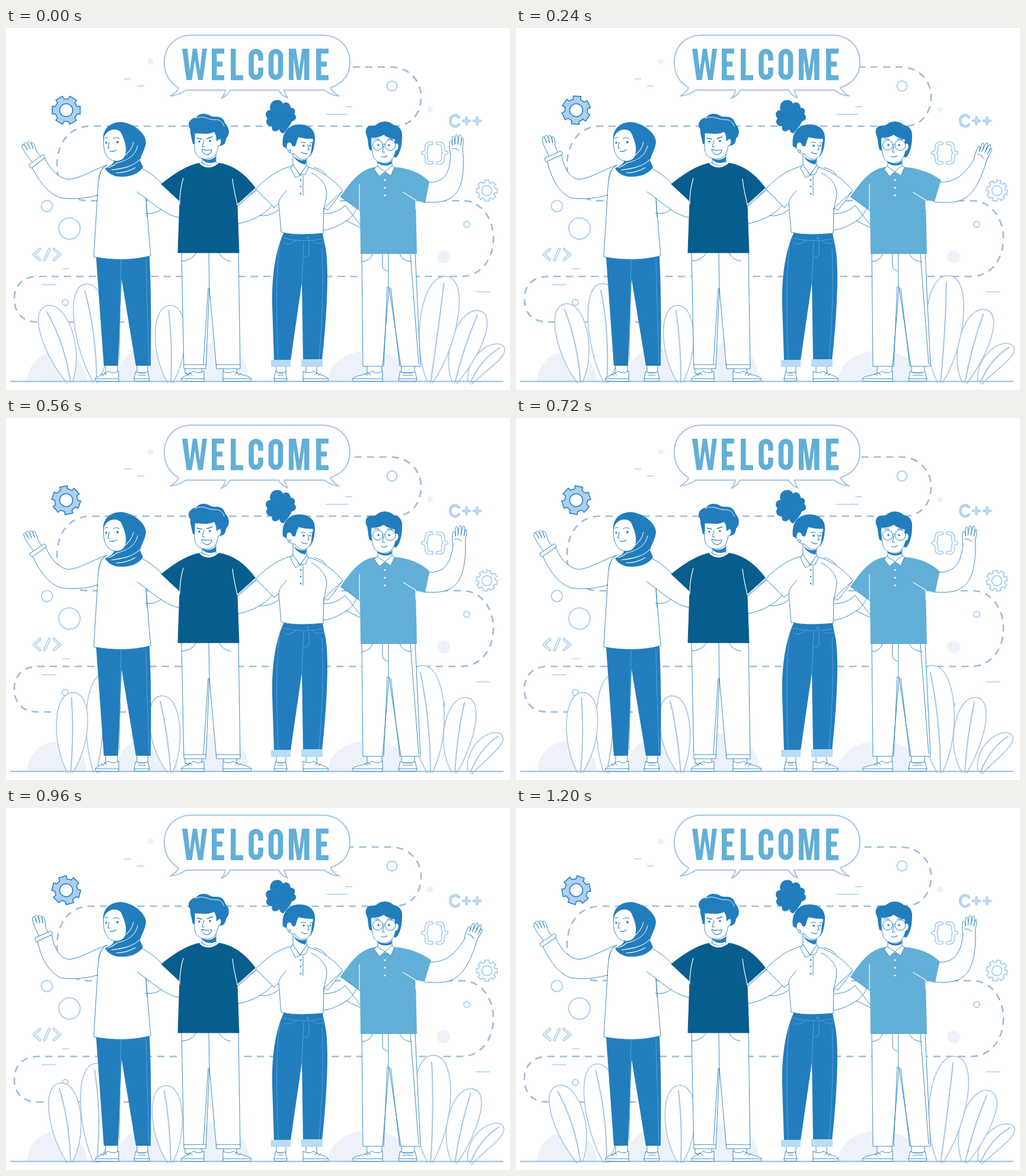
An HTML page with a canvas that plays this animation: 850 by 612 pixels, repeating every 1280 ms.

```html
<!DOCTYPE html>
<html lang="en">
<head>
<meta charset="utf-8">
<title>Welcome</title>
<style>
html, body { margin: 0; width: 100%; height: 100%; overflow: hidden; background: #fff; }
canvas { display: block; width: 850px; height: 612px; }
</style>
</head>
<body>
<canvas id="stage" width="850" height="612" role="img" aria-label="WELCOME"></canvas>
<script>
const ctx = document.getElementById('stage').getContext('2d');
const LOOP = 1280, STEP = 80;
const LINE = '#2580bf', MID = '#227dbd', DARK = '#075d8d', SKY = '#62afd7';
const PALE = '#acd0f1', SOFT = '#a6c5e4', MIST = '#edf2fa', SEAM = '#5aa6e6', WHITE = '#fff';
const RAD = Math.PI / 180;
const paths = new Map();

function path(d) {
  if (!paths.has(d)) paths.set(d, new Path2D(d));
  return paths.get(d);
}
function draw(d, fill, stroke = LINE, w = .9) {
  const p = d instanceof Path2D ? d : path(d);
  if (fill) { ctx.fillStyle = fill; ctx.fill(p); }
  if (stroke) { ctx.strokeStyle = stroke; ctx.lineWidth = w; ctx.stroke(p); }
}
const fill = (d, color) => draw(d, color, null);
const line = (d, color = LINE, w = .9) => draw(d, null, color, w);

function disc(x, y, r, color, stroke = null, w = 1) {
  const p = new Path2D();
  p.arc(x, y, r, 0, 7);
  draw(p, color, stroke, w);
}
function turned(x, y, angle, fn) {
  ctx.save();
  ctx.translate(x, y);
  ctx.rotate(angle * RAD);
  ctx.translate(-x, -y);
  fn();
  ctx.restore();
}
// Returns a function that turns points around a pivot
function turner(px, py, angle) {
  return (x, y, share = 1) => {
    const a = angle * share * RAD, c = Math.cos(a), s = Math.sin(a);
    return [px + (x - px) * c - (y - py) * s, py + (x - px) * s + (y - py) * c];
  };
}

function gear(x, y, r, teeth, angle, body, stroke, hole, w) {
  const p = new Path2D(), unit = 2 * Math.PI / teeth;
  for (let i = 0; i < teeth; i++) {
    for (const [off, k] of [[-.31, .79], [-.26, 1], [.26, 1], [.31, .79]]) {
      const a = (i + off) * unit + angle * RAD;
      p.lineTo(x + Math.cos(a) * r * k, y + Math.sin(a) * r * k);
    }
  }
  p.closePath();
  draw(p, body, stroke, w);
  disc(x, y, hole, WHITE, stroke, w);
}

function leaf(x, h, w, angle, bend) {
  turned(x, 600, angle, () => {
    const k = w * .66, low = 600 - h * .36, top = 600 - h;
    draw(new Path2D(`M${x - 4} 600C${x - k - bend} ${low} ${x - k} ${top} ${x} ${top}C${x + k} ${top} ${x + k - bend} ${low} ${x + 4} 600`), WHITE, SOFT, 1.6);
    line(new Path2D(`M${x + 1} 600Q${x + w * .08 - bend} ${600 - h * .5} ${x - w * .05} ${600 - h * .94}`), SOFT, 2);
  });
}

function sideShoe(x, w, dir) {
  ctx.save();
  ctx.translate(x, 597);
  ctx.scale(dir, 1);
  draw(new Path2D(`M0 0V-17Q9 -11 18 -17C24 -10 ${w - 8} -11 ${w - 1} -5Q${w + 1} 0 ${w - 2} 0Z`), WHITE);
  line(new Path2D(`M0 -4H${w - 1}M20 -10l5 -5M25 -9l5 -4`));
  ctx.restore();
}
function frontShoe(x, w) {
  draw(new Path2D(`M${x + 3} 581Q${x + w / 2} 586 ${x + w - 3} 581L${x + w} 594Q${x + w} 597 ${x + w - 3} 597H${x + 3}Q${x} 597 ${x} 594Z`), WHITE);
  line(new Path2D(`M${x} 593H${x + w}M${x + 7} 583h${w - 14}m0 4h${14 - w}`));
}
function legs(...xs) {
  for (const [x, w] of xs) draw(new Path2D(`M${x} 568V584H${x + w}V568`), WHITE);
}

function backdrop(t) {
  fill('M36 597A50 50 0 0 1 136 597ZM186 597A52 56 0 0 1 290 597ZM300 597A54 64 0 0 1 410 597ZM543 597A70 52 0 0 1 683 597Z', MIST);
  disc(244, 57, 5, MIST);
  disc(715, 138, 5, MIST);
  disc(738, 387, 11, MIST);
  line('M199 86h12M221 98h12M572 133h12M540 146h37M95 407h12M60 434h25M792 446h24', PALE, 1.6);

  ctx.setLineDash([12, 9]);
  ctx.lineDashOffset = -5 + 42 * t / LOOP;
  line('M580 66H650C676 66 700 86 700 116C700 146 682 166 655 166H142C106 166 86 196 86 232C86 270 106 292 140 292H770C800 292 822 320 822 356C822 392 800 420 768 420H54C28 420 14 436 14 458C14 482 28 497 54 497H212', '#a0bcd8', 2.7);
  ctx.setLineDash([]);

  const rings = [[651, 98, 8.5], [69, 301, 9.5], [107, 339, 18], [100, 464, 5], [777, 332, 5], [735, 485, 5]];
  for (const [x, y, r] of rings) disc(x, y, r, WHITE, PALE, 2);

  ctx.lineCap = 'round';
  const plus = 'M764 151C758 144 749 149 749.5 157C749 165 758 170 764 163M771 157h11M776.5 151.5v11M789 157h11M794.5 151.5v11';
  line(plus, PALE, 4.6);
  line(plus, '#d9eafa', .8);
  const code = 'M57 374L47 383L57 392M73 374L65 392M81 374L91 383L81 392';
  line(code, PALE, 5);
  line(code, WHITE, 1.6);
  const braces = 'M718 195H715Q709 195 709 202V205Q709 211 703 211Q709 211 709 217V221Q709 228 715 228H718M728 195H731Q737 195 737 202V205Q737 211 743 211Q737 211 737 217V221Q737 228 731 228H728';
  line(braces, PALE, 6.6);
  line(braces, WHITE, 3);
  ctx.lineCap = 'butt';

  const spin = 180 * t / LOOP;
  gear(101.5, 139, 24.5, 6, spin, PALE, LINE, 11, 1.6);
  gear(811, 275, 18, 8, -spin, WHITE, PALE, 8.5, 2);

  const sway = .5 - .5 * Math.cos(2 * Math.PI * t / LOOP);
  leaf(152, 168, 56, -6 + 12 * sway, -5);
  leaf(108, 136, 52, -17 + 20 * sway, -7 + 7 * sway);
  leaf(277, 131, 50, -7 * sway, 0);
  leaf(782, 84, 32, 42 - 3 * sway, 16);
  leaf(756, 129, 50, 20 - 11 * sway, 10);
  leaf(715, 182, 62, 9 - 14 * sway, 5 - 8 * sway);
}

function bubble() {
  draw('M314 12H532C562 12 580 32 580 58C580 80 567 94 547 101Q553 111 562 115Q546 113 537 105H469Q471 112 475 118Q464 114 460 105H378Q374 114 363 119Q370 111 370 105H303Q293 113 277 115Q289 108 291 101C276 92 267 78 267 58C267 32 285 12 314 12Z', WHITE, SOFT, 2);
  fill('M297 35h9l4 37 5-37h7l5 37 4-37h8l-7 53h-8l-5.5-34-5 34h-9z', SKY);
  fill('M477 88V35h12l5.5 36 5-36h12v53h-8.5V51l-5.500 37h-7l-5.500-37v37z', SKY);
  ctx.lineCap = 'butt';
  for (const x of [347, 523]) line(`M${x + 4.3} 35V88M${x} 39H${x + 21}M${x} 61H${x + 18}M${x} 84H${x + 21}`, SKY, 8.4);
  line('M383.300 35V88M379 84H400', SKY, 8.4);
  line('M429.500 55V48a8 8.500 0 0 0-16 0V75a8 8.500 0 0 0 16 0V67', SKY, 8.6);
  line('M463 48a8 8.500 0 0 0-16 0V75a8 8.500 0 0 0 16 0Z', SKY, 8.6);
  ctx.lineCap = 'round';
}

function scarfWoman(wave) {
  legs([168, 20], [221, 18]);
  sideShoe(190, 40, -1);
  frontShoe(216, 26);
  fill('M152 388L165 571H189L195 425L219 571H244C245 510 245 450 242 386Z', MID);
  line('M194 391L191 560M236 391L241 566', SEAM);

  // far arm and the body
  draw('M226 236C241 243 252 252 263 263L296 290V321C275 319 255 303 236 288L221 277', WHITE);
  const turn = 13 * wave, r = turner(95, 270, turn);
  turned(95, 270, turn, () => {
    draw('M47 230L37 217C32 211 27 203 27 198C30 195 33 200 36 206L30 196C33 190 37 196 41 205L36 194C39 189 43 195 46 204L42 194C46 191 49 199 51 207C54 212 56 216 60 218', WHITE);
    draw('M39 231L62 214Q66 215 66 219L43 237Q39 236 39 231Z', WHITE);
  });
  draw(new Path2D(`M170 232C150 238 125 255 105 256Q${r(82, 253, .5)} ${r(65, 220)}L${r(44, 236)}Q${r(65, 278, .6)} 92 287C115 291 140 287 156 282`), WHITE);
  draw('M170 232C157 238 156 254 155 270L148 387C180 393 215 393 244 385L236 288', WHITE);
  fill('M168 234L154 260L153 281L236 290L228 234Z', WHITE);
  line('M170 232C157 238 156 254 154 284M236 288L238 320M221 277L236 288');
  line('M235 313C245 315 256 312 262 306');

  fill('M164 190C162 170 177 159 193 159C214 160 235 177 236 192C236 203 228 214 226 224L231 235C224 248 205 253 187 251C177 249 170 243 167 237C177 233 182 229 183 222Z', MID);
  draw('M165 184C170 171 186 167 194 176C201 190 206 206 200 218C195 226 182 228 173 220C166 213 163 200 165 184Z', WHITE);
  line('M167 186l5-1M181 187q5-3 10 0M174 193l-2 10h3M175 208q6 2 11-2', LINE, 1.1);
  disc(169, 194, 1.7, MID);
  disc(188, 193, 1.9, MID);
  line('M215 193C213 204 206 212 197 218M222 199C219 214 206 224 187 228C182 232 177 235 172 236M226 222C214 235 194 238 178 240M218 236C207 243 196 245 186 245', WHITE, 1.1);
}

function armsBehind() {
  draw('M425 271L388 299V331C410 329 440 314 450 298Z', WHITE);
  line('M428 317C440 319 452 314 462 306');
  draw('M535 314C552 314 562 309 572 300L603 340L574 326C562 334 550 340 535 342Z', WHITE);
  line('M574 326C583 320 588 313 591 305');
}

function grinMan() {
  legs([302, 28], [367, 22]);
  sideShoe(334, 39, -1);
  sideShoe(366, 48, 1);
  draw('M296 378L300 576H337L343 440L355 576H395L392 378Z', WHITE);
  line('M300 569H337M354 569H395M341 440L333 568M342 380L343 445M297 394Q314 393 321 380M359 380Q366 393 379 394');
  draw('M330 228C310 230 285 245 262 264L293 293L290 380H393L390 300L421 271C405 249 385 232 357 228Z', DARK, DARK);
  line('M299 254C294 270 293 285 293 298', WHITE, 1.2);
  line('M382 255C384 275 388 287 390 299L421 271', WHITE, 1.2);
  line('M391 301L422 274');

  draw('M331 215V229Q342 236 354 229V213', WHITE);
  fill('M331 220C339 225 348 223 354 217V226Q340 232 331 222Z', MID);
  line('M328 229Q342 240 357 228', WHITE, 3);
  fill('M312 182C310 177 312 173 310 170C305 162 310 153 321 151C325 144 336 143 344 148C350 152 357 148 363 152C369 155 368 160 371 163C378 171 377 182 371 187C371 194 367 199 361 199L315 196Z', MID);
  draw('M318 178C319 192 316 204 320 212C326 223 342 224 351 217C356 211 357 204 358 199C363 200 365 188 360 187L355 191C356 184 353 178 351 175C341 181 329 177 318 178Z', WHITE);
  line('M319 153C333 146 342 156 352 155C361 154 366 160 368 166', WHITE, .9);
  line('M322 186l8 2M339 187l9-3', LINE, 1.4);
  line('M334 190L331 201H335', LINE, 1);
  disc(326, 192, 1.8, MID);
  disc(344, 191, 1.8, MID);
  draw('M330 205Q338 208 347 206C346 217 332 217 330 205Z', WHITE, LINE, 1.1);
}

function bunWoman() {
  legs([456, 16], [506, 18]);
  frontShoe(452, 22);
  sideShoe(501, 43, 1);
  fill('M469 345C452 380 448 430 449 470L452 562H480L499 430L501 562H533C540 500 544 430 541 390C540 370 535 357 534 346Z', MID);
  line('M467 355Q500 364 536 356M511 360V383Q509 388 503 387M502 362L499 430M468 362Q472 370 489 360M516 359Q522 368 537 362M462 363C455 410 456 480 459 560M533 372C536 430 533 500 528 560', SEAM);
  disc(509, 355, 1.7, null, SEAM);
  fill('M447 561H480V573H447ZM498 560H534V573H498Z', '#b9dcf6');

  draw('M484 233C462 238 443 250 421 272L452 303L460 297L464 345C485 351 512 349 535 347L536 304L543 308L568 275C552 255 530 240 506 234Z', WHITE);
  line('M424 275L453 304M473 275C466 283 459 290 460 298M515 245C530 252 541 266 541 280C540 292 536 300 536 310M538 303L566 277M520 236Q533 239 540 248');
  draw('M484 212V232L496 248L507 233V218', WHITE);
  fill('M485 216C492 224 500 225 507 222L505 231C496 229 488 224 485 216Z', MID);
  draw('M484 231L496 249L488 253L480 237ZM507 232L496 249L505 247L510 236Z', WHITE);
  line('M501 250V283');
  for (const y of [257, 268, 280]) disc(497, y, 1.3, MID);

  fill('M456 122C461 121 466 124 467 128C472 123 480 127 480 135C487 134 489 141 486 145C491 150 490 156 482 158C479 166 472 173 468 178C464 178 462 175 461 171C455 178 446 174 449 166C440 167 436 158 441 153C435 146 439 138 446 139C443 130 449 122 456 122Z', MID);
  fill('M467 200C464 176 477 163 495 163C513 163 522 174 521 188C520 206 516 214 512 217L480 207Z', MID);
  draw('M473 199C474 191 481 191 483 199L487 200C490 195 490 187 494 184C503 187 512 187 518 187C519 200 517 210 512 216C505 225 494 224 487 213C480 214 472 207 473 199Z', WHITE);
  fill('M517 190Q521 198 514 213Z', MID);
  line('M497 194q4-2 8 0M512 194l4 0M509 197L511 206H508M498 210q6 4 10 2', LINE, 1.1);
  disc(502, 199, 1.8, MID);
  disc(513, 199, 1.4, MID);
  disc(478, 208, 2.2, WHITE, LINE);
}

function glassesMan(wave) {
  legs([609, 25], [667, 22]);
  sideShoe(635, 51, -1);
  frontShoe(662, 31);
  draw('M600 380L602 572H635L646 438L666 572H699L690 380Z', WHITE);
  line('M643 437L637 572M649 440L664 572M645 382V440M635 382V403Q636 409 643 411M600 395Q615 394 618 382M664 382Q668 394 684 395M682 382L696 568');

  const turn = 23 * wave, r = turner(742, 275, turn);
  turned(742, 275, turn, () => {
    draw('M750 214C747 206 748 200 748 192C750 188 752 193 753 199L752 185C754 180 757 185 757 197L758 182C761 177 763 184 762 197L764 182C767 178 769 184 767 198L769 187C772 184 772 192 770 203L771 218', WHITE);
    line('M752 204Q758 202 764 207');
  });
  const inner = `M712 261C735 261 ${r(749, 252, .6)} ${r(750, 212)}`;
  const outer = `${r(771, 215)}C${r(775, 285, .7)} 750 298 706 294`;
  fill(new Path2D(`${inner}L${outer}Z`), WHITE);
  line(new Path2D(`${inner}M${outer}`));
  const s = 3 * wave;
  fill(new Path2D(`M624 235C598 238 584 257 564 285L597 309L598 382H693L691 291L${707 - s / 3} ${296 - s}L${714 + s} ${260 - s}C700 245 680 237 655 235Z`), SKY);
  line('M596 264V308M670 278L691 291V306', WHITE, 1.2);
  line('M564 285L597 309', LINE, .8);

  draw('M627 222V236L639 246L651 235V222', WHITE);
  fill('M627 225Q640 234 651 224L650 230Q638 236 627 228Z', MID);
  draw('M626 234L639 243L630 251L621 239ZM651 233L639 243L649 250L655 236Z', WHITE);
  for (const y of [257, 270, 283]) disc(639, y, 1.6, WHITE);

  fill('M613 206C610 196 611 190 609 184C605 176 606 169 612 166C617 164 620 166 624 164C632 156 646 156 654 164C663 165 669 173 668 183C668 199 665 211 658 219Z', MID);
  draw('M616 185C622 186 632 184 637 180C643 185 650 187 656 188V196C663 191 665 206 657 208C655 217 651 224 644 227C634 231 622 226 619 216C617 206 615 196 616 185Z', WHITE);
  line('M621 188q4-2 8 0M643 188q5-2 9 1M637 199L635 210H639M633 217q5 3 10-1', LINE, 1.1);
  disc(627, 198, 8.5, null, LINE);
  disc(648, 198, 9, null, LINE);
  line('M635 197q2-2 4 0');
  disc(628, 198, 1.8, MID);
  disc(646, 198, 1.8, MID);
}

function render(t) {
  const wave = Math.min(1, 1.15 * (.5 - .5 * Math.cos(4 * Math.PI * t / LOOP)));
  ctx.fillStyle = WHITE;
  ctx.fillRect(0, 0, 850, 612);
  ctx.lineCap = 'butt';
  ctx.lineJoin = 'round';
  backdrop(t);
  bubble();
  line('M8 597.5H838', '#8fbbe2', 2.2);
  scarfWoman(wave);
  armsBehind();
  grinMan();
  bunWoman();
  glassesMan(wave);
}

function tick() {
  const t = performance.now() % LOOP;
  render(Math.floor(t / STEP) * STEP);
  requestAnimationFrame(tick);
}
tick();
</script>
</body>
</html>
```
